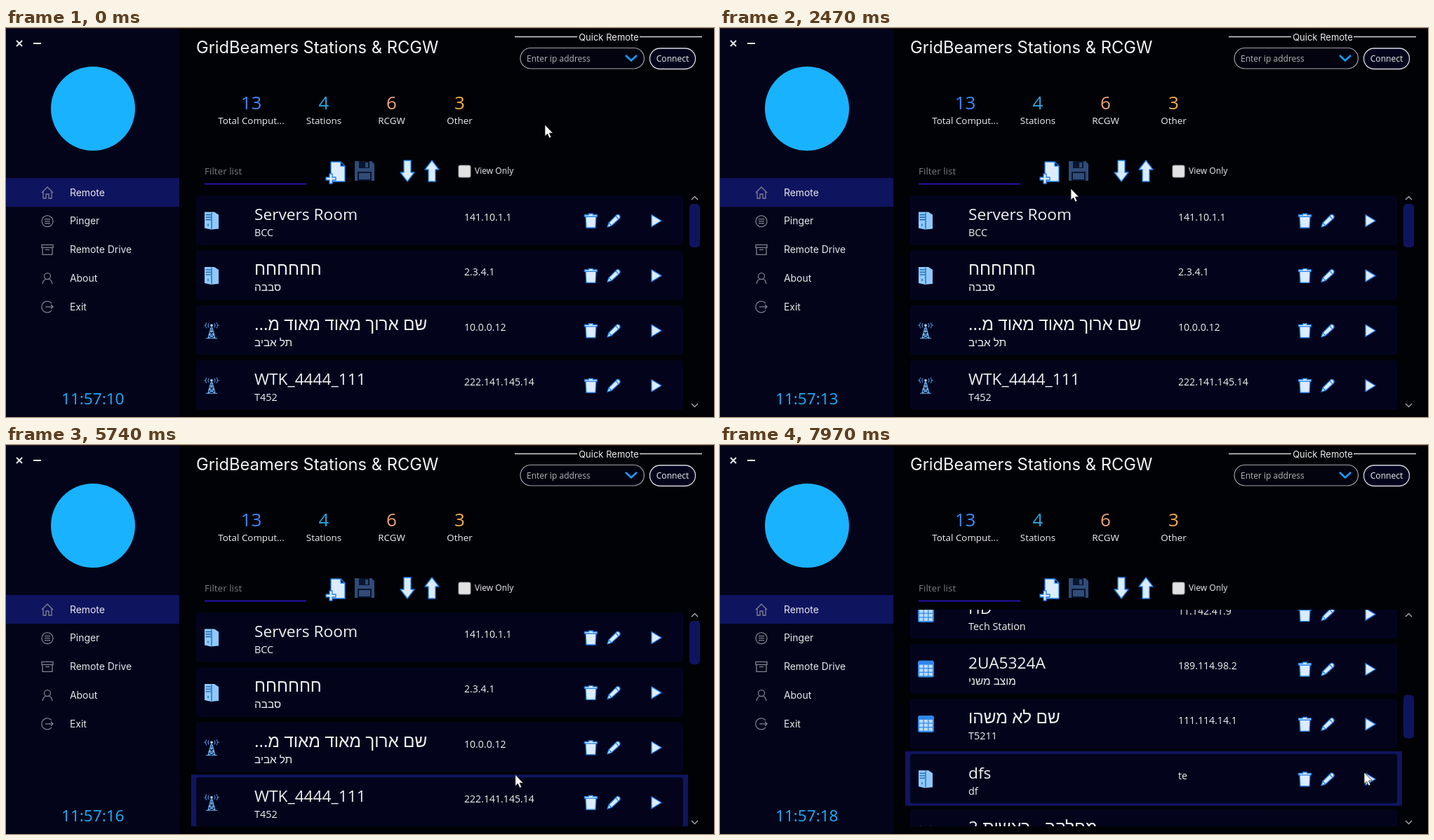
An HTML page that plays this animation: 1009 by 555 pixels, repeating every 8000 ms.

```html
<!DOCTYPE html>
<html lang="en">
<head>
<meta charset="utf-8">
<title>Remote list</title>
<style>
  html, body { margin: 0; width: 100%; height: 100%; overflow: hidden; background: #010206; }
  svg { display: block; width: 1009px; height: 555px; }
  text { font-family: "Open Sans", "Noto Sans", "Liberation Sans", sans-serif; white-space: pre; }
  .round { font-family: Inter, "Open Sans", sans-serif; }
  .line { fill: none; stroke: #80828f; stroke-width: 1.3; }
  .icon { fill: #dcecff; stroke: #1f80ea; stroke-width: 1.3; stroke-linejoin: round; }
</style>
</head>
<body>
<svg id="stage" viewBox="0 0 1009 555"></svg>
<script>
const LOOP = 8000, PITCH = 78.4, NOTCH = 86.75, LIST_TOP = 235;

const rows = [
  ['server', 'Servers Room', 'BCC', '141.10.1.1'],
  ['server', 'חחחחחח', 'סבבה', '2.3.4.1'],
  ['tower', 'שם ארוך מאוד מאוד מ...', 'תל אביב', '10.0.0.12'],
  ['tower', 'WTK_4444_111', 'T452', '222.141.145.14'],
  ['grid', 'HD', 'Tech Station', '11.142.41.9'],
  ['grid', '2UA5324A', 'מוצב משני', '189.114.98.2'],
  ['grid', 'שם לא משהו', 'T5211', '111.114.14.1'],
  ['server', 'dfs', 'df', 'te'],
  ['tower', 'מחלקה - ראשית 2', 'T4410', '10.0.0.18'],
  ['tower', 'כגדכ', "'קכגד", 'כגדכדגכ'],
  ['tower', 'Main server room', 'SBC', '10.0.0.112'],
  ['tower', 'Main RCGW', 'Operations Room', '10.0.0.14'],
  ['grid', 'Wrong IP Address', 'No real computer', 'df']
];

// Cursor path: time, x, y of the tip
const path = [
  [330, 768, 138], [600, 759, 313], [2160, 759, 313], [2470, 500, 229], [2550, 473, 203],
  [3200, 473, 203], [3470, 477, 178], [3780, 505, 203], [4180, 505, 203], [4340, 540, 280],
  [4700, 540, 280], [5040, 697, 491], [5510, 697, 491], [6450, 887, 354], [7140, 887, 354],
  [7900, 917, 464], [7970, 918, 467]
];
const wheel = [
  [1, 630, 710, 785, 860, 1100, 1240, 1320, 1400],
  [-1, 1550, 1780, 1855, 1930, 2010, 2085, 2160, 2240],
  [1, 6660, 6740, 6820, 6970]
];
const clicks = [2520, 3790, 4670, 5050];
const dialogOpen = 2780, dialogClose = 5240;
// Label, resting baseline, line end, focus start, focus end
const fields = [
  ['IP Address', 137, 616, 3320, 3800],
  ['Computer Name', 211, 665, 3800, 4670],
  ['Computer Location', 286, 665, 4670, 5060]
];

const clamp = v => Math.max(0, Math.min(1, v));
const ease = v => { v = clamp(v); return v * v * (3 - 2 * v); };

function text(x, y, size, fill, str, extra = '') {
  if (/[\u0590-\u05ff]/.test(str)) {
    size *= 1.07;
    extra += ' direction="rtl" text-anchor="end"';
  }
  return `<text x="${x}" y="${y}" font-size="${size}" fill="${fill}" ${extra}>${str}</text>`;
}
const round = (x, y, size, fill, str, extra = '') => text(x, y, size, fill, str, 'class="round" ' + extra);
const mid = 'text-anchor="middle"';
const rect = (x, y, w, h, fill, extra = '') =>
  `<rect x="${x}" y="${y}" width="${w}" height="${h}" fill="${fill}" ${extra}/>`;
const shape = (d, attrs) => `<path d="${d}" ${attrs}/>`;
const icon = d => shape(d, 'class="icon"');
const at = (x, y, body) => `<g transform="translate(${x} ${y})">${body}</g>`;

function gridIcon() {
  let s = rect(-11, -12, 23, 24, '#2f86ea', 'rx="3"');
  for (let i = 0; i < 9; i++) s += rect(-9 + i % 3 * 6.7, -6 + Math.floor(i / 3) * 5.7, 5.5, 4.5, '#b9dcff');
  return s;
}
const kinds = {
  server: shape('M-10-12H4L10-8V12L-1 13L-10 11Z', 'fill="#8fcaff"') +
    shape('M-8.500-8H-1M-8.500-4.500H-1M-8.500-1H-1M-5 5V8M0-11V12', 'stroke="#1763ad" stroke-width="1.3"'),
  tower: shape('M-1-4L-5 11M1-4L5 11M-8 11.500H8M-2 1H2M-4 6H4M-2 1L4 6M2 1L-4 6L5 11M4 6L-5 11M0-7V2', 'stroke="#6db6f5" stroke-width="1.1" fill="none"') +
    shape('M-4-10Q-6-7-4-4M4-10Q6-7 4-4M-7-11Q-10-7-7-3M7-11Q10-7 7-3M-11-7H-9M9-7H11', 'stroke="#4a93d8" stroke-width="1.1" fill="none"') +
    '<circle cy="-7" r="1.8" fill="#b9dcff"/>',
  grid: gridIcon()
};
const actions =
  at(833.5, 36, icon('M-9-8.500H-3V-10H3V-8.500H9V-6H-9ZM-7.500-6H7.500L6.500 10H-6.500Z')) +
  at(866, 36, icon('M-9 9L-7 3L4-8Q6-10 8.5-7.500Q10-5 8-3L-3 7ZM-7 3L-3 7M3-7L7-2')) +
  at(926, 36, icon('M-6-8.500L8 0L-6 8.500Z'));

const listRow = ([kind, name, place, ip], i) => at(0, 239 + i * PITCH,
  rect(271, 0, 694, 70.500, '#03041c', 'rx="4"') + at(293, 35.500, kinds[kind]) +
  text(354, 35, 22.7, '#f2f2f4', name) + text(354, 58, 14.4, '#f2f2f4', place) +
  text(653, 36, 14.1, '#f2f2f4', ip) + actions);

const menuIcons = [
  'M-8 0L0-8L8 0M-6-2V8H-2V2H2V8H6V-2',
  'M8 0A8 8 0 1 1-8 0A8 8 0 1 1 8 0M-4-3H4M-4 0H4M-4 3H4',
  'M-8-7H8V-3H-8ZM-7-3V7H7V-3M-3 0H3',
  'M4.500-3A4.500 4.500 0 1 1-4.500-3A4.500 4.500 0 1 1 4.500-3M-7 8Q-6 2-2 1M2 1Q6 2 7 8',
  'M6-5A8 8 0 1 0 6 5M-3 0H8M5-3L8 0L5 3'
];
const menu = ['Remote', 'Pinger', 'Remote Drive', 'About', 'Exit'].map((label, i) => {
  const y = 235 + i * 40.7;
  return at(59, y, shape(menuIcons[i], 'class="line"')) + round(91, y + 4.700, 13.9, '#e8e8ee', label);
}).join('');

const stats = [
  [351.5, '13', '#3d8bff', 'Total Comput...'], [453, '4', '#2ba3dc', 'Stations'],
  [549.5, '6', '#eda27c', 'RCGW'], [646.5, '3', '#f2ae4a', 'Other']
].map(([x, n, color, label]) => text(x - 2 * (n > 9), 116, 26, color, n, mid) +
  text(x - 2 * (n > 9), 136.500, 13.4, '#f0f0f2', label, mid)).join('');

const toolbar =
  icon('M463 191H477L483 197V219H463ZM477 191V197H483') +
  icon('M461 208H465V213H470V217H465V222H461V217H456V213H461Z') +
  shape('M497 190H521L525 194V218H497Z', 'fill="#304c78"') +
  rect(503, 190, 15, 10, '#0a1530') + rect(512, 192, 4, 7, '#304c78') +
  rect(501, 205, 20, 13, '#0a1530') + rect(503, 207, 16, 9, '#304c78') +
  icon('M567 189H577V206H582L572 219L562 206H567Z') +
  icon('M602 219H612V202H617L607 189L597 202H602Z') +
  rect(645, 196, 17, 17, '#e2e2e2', 'rx="2" stroke="#a5a5a5"');

const header =
  round(271, 36, 23.7, '#f4f4f6', 'GridBeamers Stations &amp; RCGW') +
  shape('M725 12.500H814M903 12.500H992', 'stroke="#d5d5d5" stroke-width="1.4"') +
  round(859, 17.500, 13, '#eee', 'Quick Remote', mid) +
  rect(733, 28.500, 176.500, 29.500, '#02030f', 'rx="14.7" stroke="#a2a2aa" stroke-width="1.2"') +
  text(742, 47.500, 12, '#b6b6bc', 'Enter ip address') +
  shape('M883 39L891 46.500L899 39', 'fill="none" stroke="#149fff" stroke-width="2.6"') +
  rect(917.500, 29, 65, 29.500, '#03041c', 'rx="14.700" stroke="#d8d8e4" stroke-width="1.3"') +
  text(950, 48, 12.1, '#f0f0f2', 'Connect', mid);

const radios = ['Station', 'RCGW', 'Other'].map((label, i) => {
  const y = 357.500 + i * 33;
  return `<circle cx="429.500" cy="${y}" r="8.700" fill="#dedede" stroke="#a8a8a8"/>` +
    (i ? '' : `<circle cx="429.500" cy="${y}" r="4.700" fill="#444"/>`) +
    text(443, y + 4, 12, '#f2f2f4', label);
}).join('');

const fieldMarkup = fields.map(([label, y, end], i) =>
  text(422, y, 16.6, '#77797f', label, `id="label${i}"`) +
  rect(422.500, y + 14, end - 422.500, 2, '#2413a8') +
  rect(422.500, y + 14, 0, 2, '#4d8dff', `id="focus${i}"`)).join('');

document.getElementById('stage').innerHTML =
  `<defs><clipPath id="view">${rect(264, LIST_TOP, 709, 309, '#fff')}</clipPath></defs>` +
  rect(0, 0, 1009, 555, '#010206') +
  `<g id="main">${header}${stats}${toolbar}` +
  text(283, 209, 13.5, '#7a7b80', 'Filter list') + rect(283, 221.500, 145, 2, '#2413a8') +
  text(668, 208, 12.1, '#f0f0f2', 'View Only') +
  `<g clip-path="url(#view)"><g id="list">${rect(264, 0, 708, 78, '#0f1560', 'id="hover"')}${rows.map(listRow).join('')}</g></g>` +
  rect(974, 251, 15, 62, '#0f145f', 'rx="5" id="thumb"') +
  shape('M977 245L981.500 240.500L986 245M977 536L981.500 540.500L986 536', 'fill="none" stroke="#a0a0a6" stroke-width="1.5"') +
  '</g>' +
  rect(0, 0, 247, 555, '#03041a') + rect(0, 214, 247, 41, '#0f145f') +
  rect(0, 0, 1009, 1, '#30201e') +
  shape('M15 18L23 26M23 18L15 26M39 22H50', 'stroke="#f5f5f5" stroke-width="1.8"') +
  '<circle cx="124" cy="115" r="60" fill="#19b2ff"/>' + menu +
  text(79, 537, 22.6, '#19b2ff', '', 'id="clock"') +
  `<g id="dialog">${rect(400.500, 30.500, 464, 500, '#03041a', 'stroke="#e8e8ee"')}` +
  round(421, 70, 27.8, '#fff', 'Add new computer') + fieldMarkup +
  text(421, 334, 12.8, '#f2f2f4', 'Computer Type:') + radios +
  rect(534.500, 466.500, 87, 44, 'none', 'stroke="#0b1a3c"') + text(578, 493, 12.9, '#62646e', 'Save', mid) +
  rect(632.500, 466.500, 99, 44, 'none', 'stroke="#12386c" id="cancel"') + text(682, 493, 12.9, '#f2f2f4', 'Cancel', mid) +
  '</g><g id="cursor"><circle id="click" cx="1" cy="2" r="13" fill="#d8cc38" fill-opacity=".8"/>' +
  shape('M0 0V16.500L3.700 13L6.300 19L9 17.800L6.400 12H11.500Z', 'fill="#fff" stroke="#111" stroke-width=".8"') + '</g>';

const el = id => document.getElementById(id);
const set = (id, attrs) => { for (const k in attrs) el(id).setAttribute(k, attrs[k]); };
const show = (id, on) => { el(id).style.display = on ? '' : 'none'; };

function cursorAt(t) {
  const i = path.findIndex(p => p[0] > t);
  if (i < 0) return path[path.length - 1].slice(1);
  if (i === 0) return path[0].slice(1);
  const [t0, x0, y0] = path[i - 1], [t1, x1, y1] = path[i];
  const k = ease((t - t0) / (t1 - t0));
  return [x0 + (x1 - x0) * k, y0 + (y1 - y0) * k];
}

function drawField([, y, end, start, stop], i, t) {
  const focused = t >= start && t < stop;
  const lift = t < stop ? ease((t - start) / 140) : 1 - ease((t - stop - 50) / 150);
  const grow = t < stop ? ease((t - start - 150) / 200) : 1 - clamp((t - stop) / 270);
  const width = (end - 422.500) * grow;
  set('label' + i, {
    y: y - 24 * lift, 'font-size': focused ? 16.6 - 3.6 * lift : 16.6,
    fill: focused ? '#5284e6' : '#77797f'
  });
  set('focus' + i, { x: (422.500 + end - width) / 2, width });
}

function draw(t) {
  const [x, y] = cursorAt(t);
  const notches = wheel.reduce((sum, [dir, ...times]) => sum + dir * times.filter(v => v <= t).length, 0);
  const scroll = notches * NOTCH;
  const open = t >= dialogOpen && t < dialogClose + 150;
  const fade = Math.min(clamp((t - dialogOpen) / 150), 1 - clamp((t - dialogClose) / 150));

  set('list', { transform: `translate(0 ${-scroll})` });
  set('thumb', { y: 251 + 211 * notches / 8 });
  const row = Math.floor((y + scroll - LIST_TOP) / PITCH);
  show('hover', !open && y >= LIST_TOP);
  set('hover', { y: LIST_TOP + row * PITCH });

  el('main').style.filter = open ? `blur(${2 * fade}px)` : 'none';
  show('dialog', open);
  el('dialog').style.opacity = fade;
  fields.forEach((f, i) => drawField(f, i, t));
  set('cancel', { fill: x > 632 && y > 466 ? '#4a5097' : 'none' });

  el('clock').textContent = '11:57:' + (10 + Math.floor((t + 680) / 1000));
  set('cursor', { transform: `translate(${x} ${y})` });
  show('click', clicks.some(c => t >= c && t < c + 150));
}

const began = performance.now();
function frame() {
  draw((performance.now() - began) % LOOP);
  requestAnimationFrame(frame);
}
frame();
</script>
</body>
</html>
```
